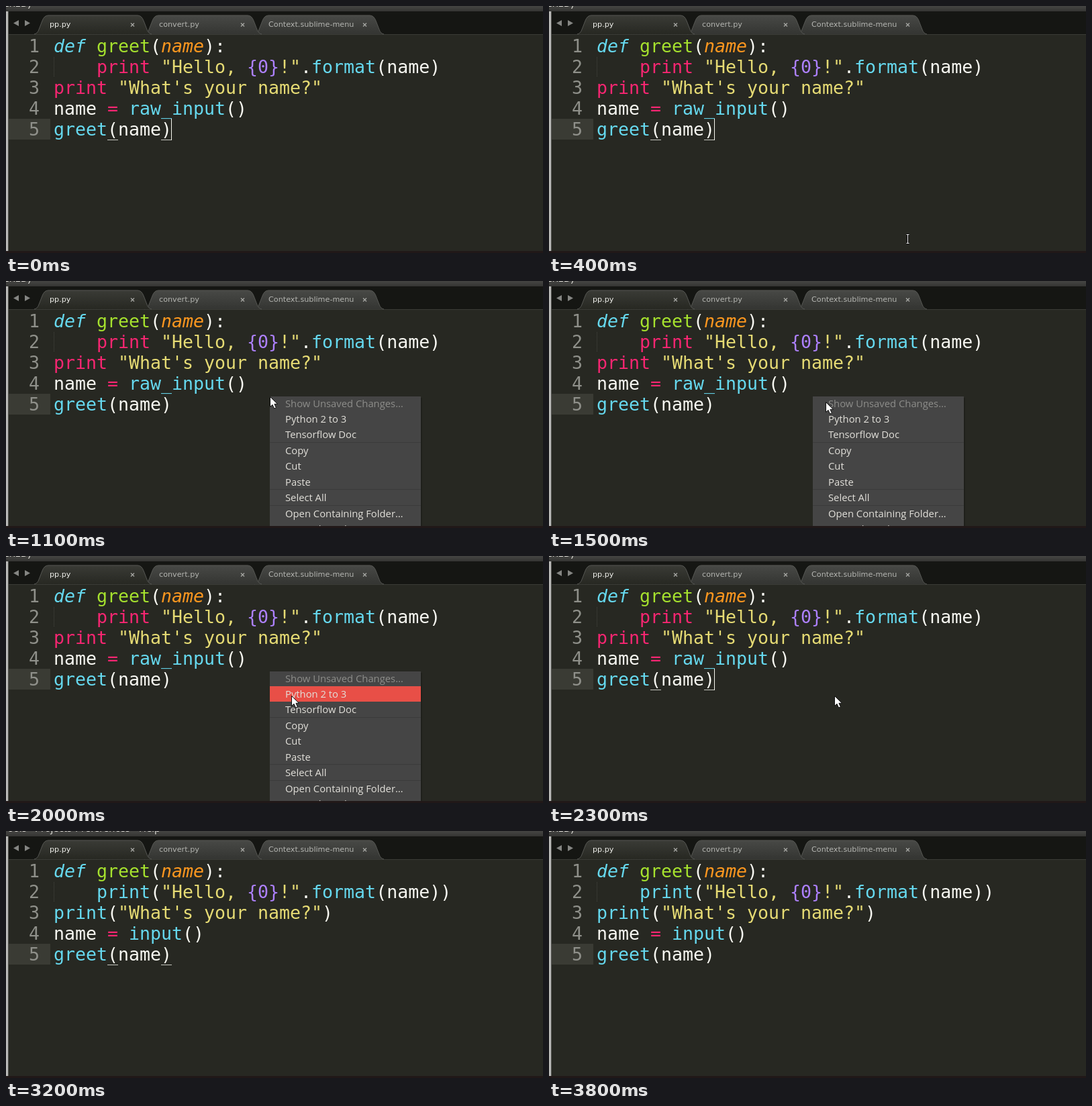
An HTML page for the animation above (3.9 s loop, 800 px wide and 368 px high).

```html
<!DOCTYPE html>
<html lang="en">
<head>
<meta charset="utf-8">
<title>Editor: Python 2 to 3</title>
<style>
  html, body { margin: 0; width: 100%; height: 100%; overflow: hidden; background: #272822; }
  svg { display: block; }
  text { white-space: pre; }
  .code { font: 26.58px "DejaVu Sans Mono", monospace; fill: #f8f8f2; }
  .tabs { font: 11.2px "DejaVu Sans", sans-serif; fill: #b4b5b1; }
  .menu, .panel { font: 14.8px "Open Sans", sans-serif; fill: #e2e0da; }
  .num { fill: #8f908a; }
  .blue { fill: #66d9ef; }
  .def { fill: #66d9ef; font-style: italic; }
  .func { fill: #a6e22e; }
  .param { fill: #fd971f; font-style: italic; }
  .pink { fill: #f92672; }
  .str { fill: #e6db74; }
  .purple { fill: #ae81ff; }
</style>
</head>
<body>
<svg width="800" height="368" viewBox="0 0 800 368">
  <defs>
    <linearGradient id="bar" x2="0" y2="1"><stop stop-color="#454543"/><stop offset="1" stop-color="#353533"/></linearGradient>
    <linearGradient id="active" x2="0" y2="1"><stop stop-color="#3a3b36"/><stop offset="1" stop-color="#272822"/></linearGradient>
    <linearGradient id="idle" x2="0" y2="1"><stop stop-color="#484946"/><stop offset="1" stop-color="#343532"/></linearGradient>
  </defs>
  <rect width="800" height="368" fill="#272822"/>
  <rect y="8" width="800" height="34" fill="#151613"/>
  <path d="M0 42.5H800" stroke="#3b3c37"/>
  <g id="tabs" class="tabs"></g>
  <path d="M19 21v9l-8-4.5zM28 21v9l8-4.5z" fill="#858683"/>
  <rect width="800" height="8" fill="url(#bar)"/>
  <g class="panel">
    <text id="title" x="37" y="1" text-anchor="end">(UNREGISTERED)</text>
    <g id="menubar"><text x="-5" y="1">Tools</text><text x="43" y="1">Projects</text><text x="103" y="1">Preferences</text><text x="198" y="1">Help</text></g>
  </g>
  <rect y="8" width="3" height="360" fill="#b9b9b7"/>
  <rect x="3" y="8" width="1" height="360" fill="#50504c"/>
  <rect x="4" y="168" width="62" height="31" fill="#3a3b34"/>
  <path d="M71.5 76V106" stroke="#45463f" stroke-dasharray="1 1"/>
  <g id="numbers" class="code"></g>
  <g id="before" class="code"></g>
  <g id="after" class="code"></g>
  <path id="brackets" d="M151 199.5h16M231 199.5h16" stroke="#c4c5bd"/>
  <path id="caret" d="M246.5 168V200" stroke="#f8f8f0"/>
  <g id="menu" class="menu">
    <rect x="395" y="174" width="225" height="194" fill="#000" opacity=".2"/>
    <rect x="393" y="172" width="225" height="196" fill="#454545"/>
    <path d="M393 240.5h225M393 310.5h225M393 334.5h225" stroke="#3b3b3b"/>
    <rect id="hover" x="393" y="194" width="225" height="23" fill="#e84f47"/>
  </g>
  <path id="arrow" d="M.5 .5V15.5L4 12.3L6.6 18L9.4 16.8L6.9 11.3H11.5Z" fill="#fff" stroke="#111"/>
  <g id="beam" fill="none"><path d="M-2-6.5H2M-2 6.5H2M0-6.5V6.5" stroke="#111" stroke-width="3"/><path d="M-2-6.5H2M-2 6.5H2M0-6.5V6.5" stroke="#eee"/></g>
  <rect y="365" width="800" height="3" fill="#211818"/>
</svg>
<script>
const el = id => document.getElementById(id);
const add = (id, markup) => el(id).insertAdjacentHTML('beforeend', markup);
const show = (id, on) => el(id).style.display = on ? '' : 'none';

// Tabs, the active one last so that it lies on top
for (const [x, end, name, labelX, fill] of [
  [370, 563, 'Context.sublime-menu', 391, 'idle'],
  [206, 381, 'convert.py', 228, 'idle'],
  [42, 217, 'pp.py', 65, 'active']
]) {
  add('tabs', `<path d="M${x} 42q5-1 7-7l5-13q3-8 9-8H${end - 21}q6 0 9 8l5 13q2 6 7 7" fill="url(#${fill})" stroke="#565753"/>
    <text x="${labelX}" y="31" ${fill === 'active' ? 'fill="#f0f0ec"' : ''}>${name}</text>
    <path d="M${end - 31} 25.5l5 5m0-5l-5 5" stroke="#a5a6a2" stroke-width="1.4"/>`);
}

// Code, with {class|text} marking coloured spans
const paint = line => line.replace(/<(\w+)\|([^>]*)>/g, '<tspan class="$1">$2</tspan>');
function writeCode(id, lines) {
  lines.forEach((line, i) => add(id, `<text x="71" y="${69 + 31 * i}">${paint(line)}</text>`));
}
const head = '<def|def> <func|greet>(<param|name>):';
const hello = '<str|"Hello, ><purple|{0}><str|!">.<blue|format>(name)';
const question = `<str|"What's your name?">`;
const call = '<blue|greet>(name)';
writeCode('before', [head, `    <pink|print> ${hello}`, `<pink|print> ${question}`,
  'name <pink|=> <blue|raw_input>()', call]);
writeCode('after', [head, `    <blue|print>(${hello})`, `<blue|print>(${question})`,
  'name <pink|=> <blue|input>()', call]);
for (let i = 0; i < 5; i++) add('numbers', `<text class="num" x="34" y="${69 + 31 * i}">${i + 1}</text>`);

// Context menu; separators shift the later items by a pixel
['Show Unsaved Changes…', 'Python 2 to 3', 'Tensorflow Doc', 'Copy', 'Cut', 'Paste',
  'Select All', 'Open Containing Folder…', 'Copy File Path'].forEach((label, i) => {
  const y = 188 + 23.2 * i + (i > 2) * .5 + (i > 5) * .5 + (i > 6) * .5;
  add('menu', `<text x="416" y="${Math.round(y)}" ${i ? '' : 'fill="#8d8d8a"'}>${label}</text>`);
});

// Pointer stops: time, x, y
const stops = [[300, 560, 380], [700, 391, 171], [1000, 391, 171], [1500, 412, 180],
  [1700, 414, 184], [2000, 425, 208], [2300, 425, 208], [2700, 461, 197], [3100, 440, -20]];
function pointerAt(t) {
  const next = stops.findIndex(s => s[0] > t);
  if (next < 1) return null;
  const [t0, x0, y0] = stops[next - 1], [t1, x1, y1] = stops[next];
  const p = (t - t0) / (t1 - t0), e = p * p * (3 - 2 * p);
  return { x: x0 + (x1 - x0) * e, y: y0 + (y1 - y0) * e };
}

const within = (t, from, to) => t >= from && t < to;

function draw(now) {
  const t = Math.floor(now % 3900 / 100) * 100;
  const menuOpen = within(t, 900, 2300);
  const converted = t >= 2400;
  const inPanel = within(t, 3100, 3700);
  const arrow = within(t, 700, 2400);
  const pointer = pointerAt(t);

  show('before', !converted);
  show('after', converted);
  show('menu', menuOpen);
  show('hover', pointer && within(pointer.y, 194, 217));
  show('brackets', !menuOpen && t < 3700);
  show('caret', t < 500 || within(t, 2300, 2700) || within(t, 3300, 3700));
  show('menubar', inPanel);
  show('title', !inPanel);
  show('arrow', pointer && arrow);
  show('beam', pointer && !arrow);
  if (pointer) {
    const x = Math.round(pointer.x), y = Math.round(pointer.y);
    el('arrow').setAttribute('transform', `translate(${x} ${y})`);
    el('beam').setAttribute('transform', `translate(${x + .5} ${y})`);
  }
  requestAnimationFrame(() => draw(performance.now() - start));
}
const start = performance.now();
draw(0);
</script>
</body>
</html>
```
